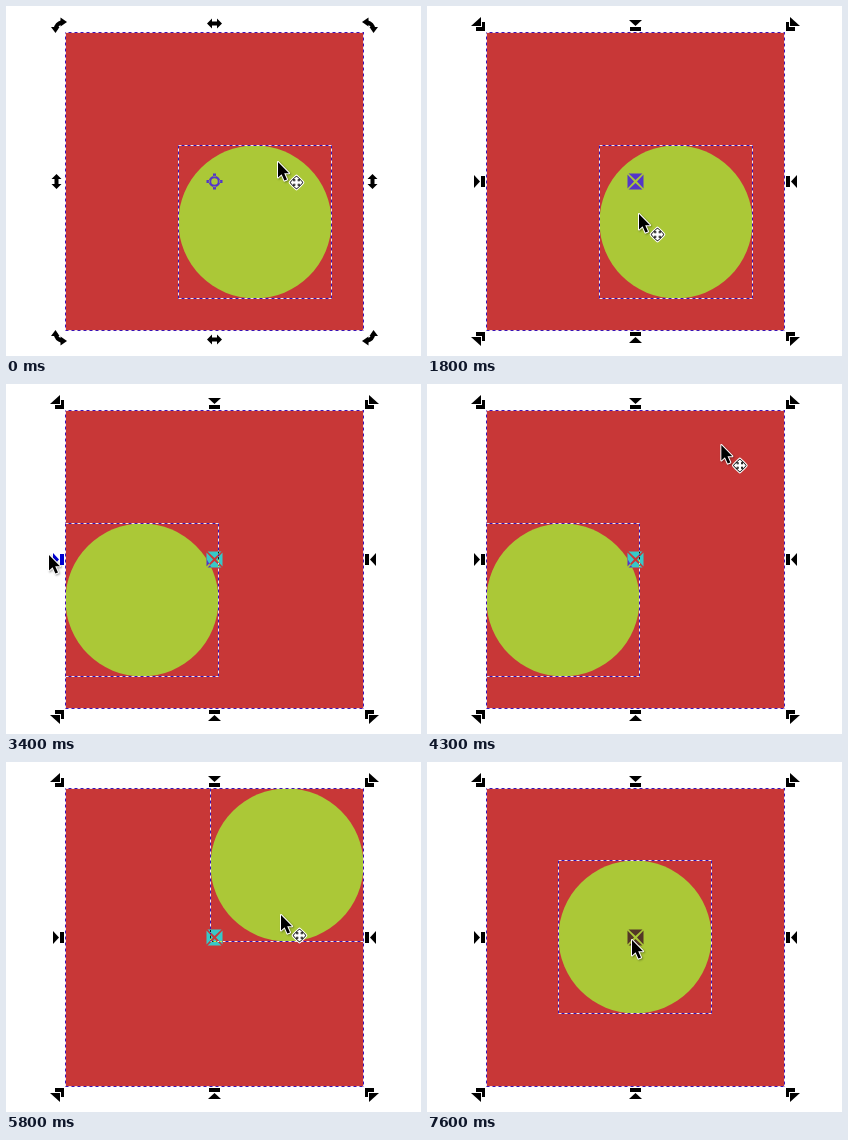
An HTML page with a canvas for the animation above (8 s loop, 415 by 350 pixels).

```html
<!DOCTYPE html>
<html lang="en">
<head>
<meta charset="utf-8">
<title>Aligning a circle to a square</title>
<style>
  html, body { margin: 0; width: 100%; height: 100%; overflow: hidden; background: #fff; }
  canvas { display: block; }
</style>
</head>
<body>
<canvas id="stage" width="415" height="350"></canvas>
<script>
const ctx = document.getElementById('stage').getContext('2d');
const LOOP = 8000, STEP = 100;
const CX = 208.5, CY = 175.5, HALF = 149, RADIUS = 76.5;
const RED = '#c83737', GREEN = '#abc837', HOVER = '#0000d0';

// Circle centre: [start time, x, y], changes are instant
const circleStops = [[0, 249, 216], [3400, 136, 216], [5400, 281, 103], [6900, 281, 175], [7600, 208, 175]];

// Pointer tip: [time, x, y], linear in between
const pointerPath = [
  [0, 271, 155], [200, 275, 175], [300, 277, 182],
  [1500, 277, 182], [1600, 262, 188], [1800, 211, 207], [2000, 142, 228], [2200, 75, 205], [2400, 43, 170],
  [2500, 43, 170], [2600, 42, 170],
  [3700, 42, 170], [3800, 54, 167], [4100, 190, 110], [4400, 345, 35], [4500, 370, 24], [4600, 359, 19], [4700, 357, 17],
  [5400, 357, 17], [5500, 352, 26], [5600, 334, 62], [5700, 304, 115], [5800, 274, 152], [5900, 244, 160],
  [6100, 217, 172], [6400, 204, 177], [LOOP, 204, 177]
];

const between = (t, from, to) => t >= from && t < to;

function pointerAt(t) {
  const i = pointerPath.findIndex(key => key[0] > t);
  const [t0, x0, y0] = pointerPath[i - 1], [t1, x1, y1] = pointerPath[i];
  const k = (t - t0) / (t1 - t0);
  return [x0 + (x1 - x0) * k, y0 + (y1 - y0) * k];
}

function polygon(...points) {
  ctx.beginPath();
  points.forEach(([x, y]) => ctx.lineTo(x, y));
  ctx.closePath();
}

function fillPolygon(...points) {
  polygon(...points);
  ctx.fill();
}

function at(x, y, draw, angle = 0) {
  ctx.save();
  ctx.translate(x, y);
  ctx.rotate(angle);
  draw();
  ctx.restore();
}

// Draws with the stage mirrored about the centre of the square
function mirrored(sx, sy, color, draw) {
  at(CX, CY, () => {
    ctx.scale(sx, sy);
    ctx.translate(-CX, -CY);
    ctx.fillStyle = ctx.strokeStyle = color;
    draw();
  });
}

function dashedBox(x, y, size) {
  ctx.lineWidth = 1;
  ctx.strokeStyle = '#3c14b4';
  ctx.strokeRect(x, y, size, size);
  ctx.strokeStyle = '#f6e4e8';
  ctx.setLineDash([3, 3]);
  ctx.strokeRect(x, y, size, size);
  ctx.setLineDash([]);
}

function doubleArrow() {
  fillPolygon([-7.5, 0], [-2.5, -5], [-2.5, -2], [2.5, -2], [2.5, -5],
    [7.5, 0], [2.5, 5], [2.5, 2], [-2.5, 2], [-2.5, 5]);
}

function curvedArrow() {
  ctx.lineWidth = 4;
  ctx.beginPath();
  ctx.arc(58, 24.5, 8.5, Math.PI * 1.05, Math.PI * 1.42);
  ctx.stroke();
  fillPolygon([54.5, 11.5], [61, 16], [54.5, 20.5]);
  fillPolygon([45, 21], [53.5, 21], [49.5, 27]);
}

function alignCorner() {
  fillPolygon([44, 20], [54, 20], [54, 11]);
  fillPolygon([55, 16], [58, 16], [58, 25], [49, 25], [49, 21], [55, 21]);
}

function alignTop() {
  fillPolygon([202, 14], [215, 14], [208.5, 20]);
  ctx.fillRect(203, 21, 11, 4);
}

function alignLeft() {
  fillPolygon([47, 169], [53, 175.5], [47, 182]);
  ctx.fillRect(54, 170, 4, 11);
}

function drawHandles(aligning, t) {
  for (const s of [1, -1]) {
    for (const sy of [1, -1]) {
      const hot = s < 0 && sy > 0 && between(t, 4700, 5500);
      mirrored(s, sy, hot ? HOVER : '#000', aligning ? alignCorner : curvedArrow);
    }
    const hot = s > 0 && between(t, 2400, 3800);
    mirrored(1, s, '#000', aligning ? alignTop : () => at(CX, 17.5, doubleArrow));
    mirrored(s, 1, hot ? HOVER : '#000',
      aligning ? alignLeft : () => at(50.5, CY, doubleArrow, Math.PI / 2));
  }
}

// The centre handle inverts what lies under it
function drawCentre(aligning, hot) {
  ctx.save();
  ctx.globalCompositeOperation = 'difference';
  ctx.fillStyle = ctx.strokeStyle = hot ? '#ffff10' : '#fff';
  for (let i = 0; i < 4; i++) {
    at(CX, CY, () => {
      if (aligning) fillPolygon([-7, -8], [7, -8], [0, -1.5]);
      else ctx.fillRect(-1.5, -8, 3, 3);
    }, i * Math.PI / 2);
  }
  if (!aligning) {
    ctx.lineWidth = 2.5;
    ctx.beginPath();
    ctx.arc(CX, CY, 4.5, 0, Math.PI * 2);
    ctx.stroke();
  }
  ctx.restore();
}

function moveBadge() {
  const points = [];
  for (let i = 0; i < 4; i++) {
    const c = [1, 0, -1, 0][i], s = [0, 1, 0, -1][i];
    for (const [x, y] of [[1.2, -1.2], [3.2, -1.2], [3.2, -3], [6, 0], [3.2, 3], [3.2, 1.2]]) {
      points.push([x * c - y * s, x * s + y * c]);
    }
  }
  polygon(...points);
  ctx.strokeStyle = '#fff';
  ctx.lineWidth = 3.6;
  ctx.stroke();
  ctx.strokeStyle = '#000';
  ctx.lineWidth = 1.4;
  ctx.stroke();
  ctx.fillStyle = '#fff';
  ctx.fill();
}

function drawPointer(x, y, overObject) {
  at(x, y, () => {
    ctx.lineJoin = 'round';
    polygon([1, 1], [1, 16.5], [4.6, 13.2], [7.4, 19.6], [10, 18.5], [7.2, 12.2], [12, 12.2]);
    ctx.save();
    ctx.shadowColor = 'rgba(0,0,0,.35)';
    ctx.shadowBlur = 2;
    ctx.shadowOffsetX = ctx.shadowOffsetY = 1;
    ctx.strokeStyle = '#fff';
    ctx.lineWidth = 2;
    ctx.stroke();
    ctx.restore();
    ctx.fillStyle = '#000';
    ctx.fill();
    if (overObject) at(19.5, 21.5, moveBadge);
  });
}

function draw(t) {
  const [, x, y] = circleStops.filter(stop => stop[0] <= t).pop();
  const [px, py] = pointerAt(t);
  const aligning = t >= 1000, centreHot = t >= 6400;
  const overObject = Math.abs(px - CX) < HALF && Math.abs(py - CY) < HALF && !centreHot;

  ctx.fillStyle = '#fff';
  ctx.fillRect(0, 0, 415, 350);
  ctx.fillStyle = RED;
  ctx.fillRect(CX - HALF, CY - HALF, HALF * 2, HALF * 2);
  ctx.fillStyle = GREEN;
  ctx.beginPath();
  ctx.arc(x, y, RADIUS, 0, Math.PI * 2);
  ctx.fill();

  dashedBox(CX - HALF, CY - HALF, HALF * 2);
  dashedBox(x - RADIUS, y - RADIUS, RADIUS * 2);
  drawHandles(aligning, t);
  drawCentre(aligning, centreHot);
  drawPointer(px, py, overObject);
}

const start = performance.now();
function tick() {
  const elapsed = (performance.now() - start) % LOOP;
  draw(Math.floor(elapsed / STEP) * STEP);
  requestAnimationFrame(tick);
}
tick();
</script>
</body>
</html>
```
